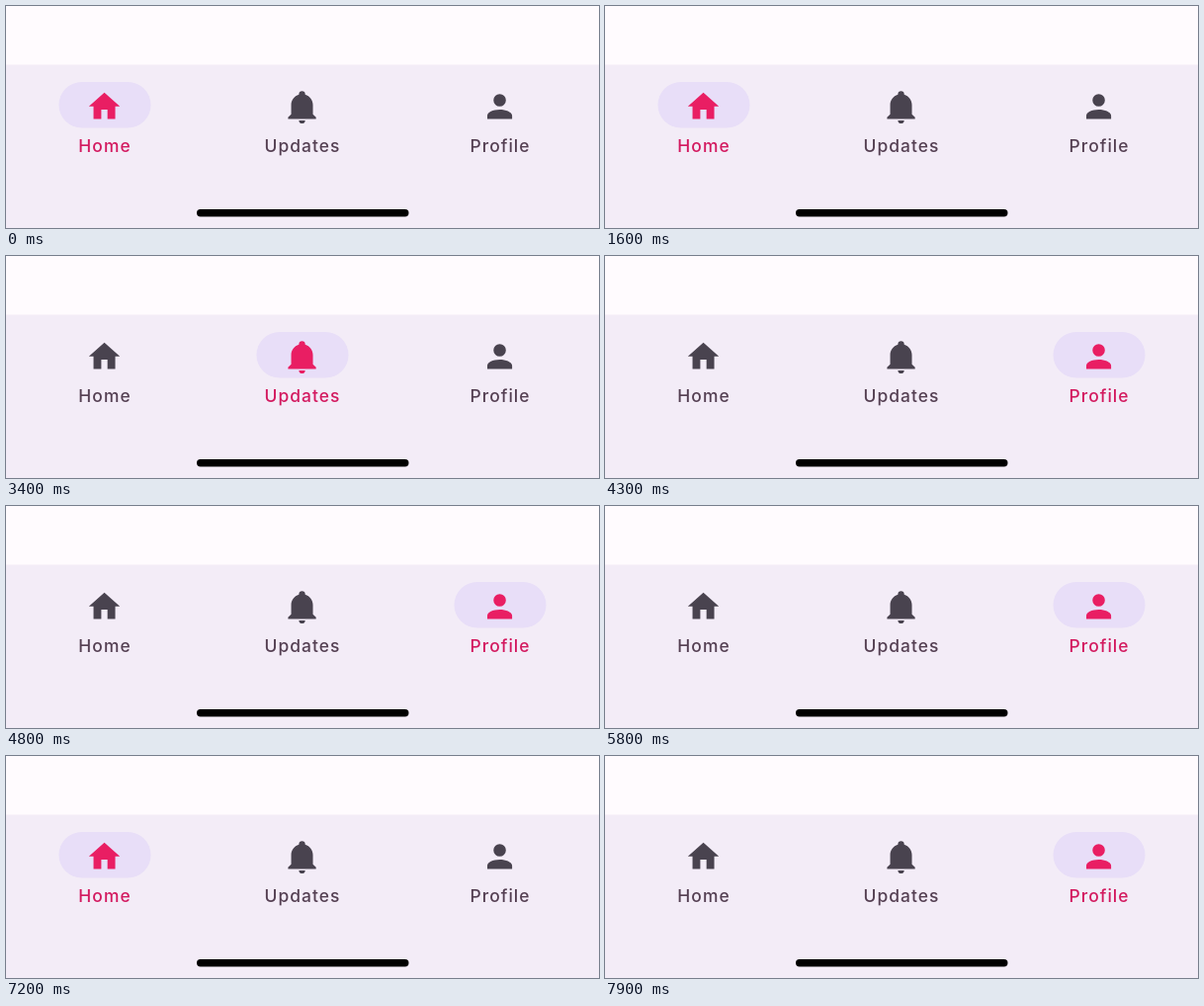
An HTML page that plays this animation: 600x225 px, repeating every 8000 ms.

```html
<!DOCTYPE html>
<html lang="en">
<head>
<meta charset="utf-8">
<title>Bottom navigation</title>
<style>
  html, body { margin: 0; width: 100%; height: 100%; overflow: hidden; background: #fffbfe; }
  svg { display: block; width: 600px; height: 225px; }
  text { font: 500 17.4px Inter, sans-serif; letter-spacing: 1.05px; text-anchor: middle; }
</style>
</head>
<body>
<svg id="stage" viewBox="0 0 600 225">
  <rect y="59.5" width="600" height="165.5" fill="#f3ecf7"/>
  <g id="tabs"></g>
  <rect x="193" y="206" width="214.5" height="7.4" rx="3.7"/>
</svg>
<script>
const LOOP = 8000, DURATION = 150;
const PINK = '#e91e63', LABEL_PINK = '#d3195f', ICON_GREY = '#49434f';
const LABEL_GREY = '#543f52', LABEL_DARK = '#2b1626';

// Each entry: time of the tap, tab index
const taps = [[-1000, 0], [2685, 1], [4140, 2], [6002, 0], [7230, 2]];

const items = [
  ['Home', 'M10 20v-6h4v6h5v-8h3L12 3 2 12h3v8z'],
  ['Updates', 'M21 19v1H3v-1l2-2v-6c0-3.1 2.03-5.83 5-6.71V4a2 2 0 0 1 4 0v.29c2.97.88 5 3.61 5 6.71v6zM14 21a2 2 0 0 1-4 0'],
  ['Profile', 'M12 4a4 4 0 0 1 0 8 4 4 0 0 1 0-8m0 10c4.42 0 8 1.79 8 4v2H4v-2c0-2.21 3.58-4 8-4z']
];

function add(parent, tag, attrs, text = '') {
  const el = document.createElementNS('http://www.w3.org/2000/svg', tag);
  for (const key in attrs) el.setAttribute(key, attrs[key]);
  el.textContent = text;
  return parent.appendChild(el);
}

const tabs = items.map(([name, path], i) => {
  const g = add(document.getElementById('tabs'), 'g', { transform: `translate(${100 + 200 * i} 0)` });
  const label = fill => add(g, 'text', { x: 0, y: 147.6, fill }, name);
  return {
    pill: add(g, 'rect', { x: -46.5, y: 77, width: 93, height: 46.5, rx: 23.25, fill: '#e8def8' }),
    icon: add(g, 'path', { d: path, transform: 'translate(-19.3 83) scale(1.57)' }),
    inactive: label(LABEL_GREY),
    active: label(LABEL_PINK)
  };
});

function easeInOut(t) {
  const ease = x => x ** 1.75;
  return t < 0.5 ? ease(2 * t) / 2 : 1 - ease(2 - 2 * t) / 2;
}

function draw(time) {
  const now = taps.findLastIndex(([start]) => time >= start);
  const [start, current] = taps[now];
  const previous = now ? taps[now - 1][1] : -1;
  const progress = easeInOut(Math.min(1, (time - start) / DURATION));

  tabs.forEach((tab, i) => {
    const focused = i === current;
    const amount = focused ? progress : i === previous ? 1 - progress : 0;
    tab.pill.setAttribute('transform', `scale(${focused ? 0.5 + amount / 2 : 0} 1)`);
    tab.icon.setAttribute('fill', focused ? PINK : ICON_GREY);
    tab.inactive.setAttribute('fill', focused ? LABEL_DARK : LABEL_GREY);
    tab.inactive.setAttribute('opacity', 1 - amount);
    tab.active.setAttribute('opacity', amount);
  });
}

let origin;
function frame() {
  const now = performance.now();
  origin ??= now;
  draw((now - origin) % LOOP);
  requestAnimationFrame(frame);
}
frame();
</script>
</body>
</html>
```
